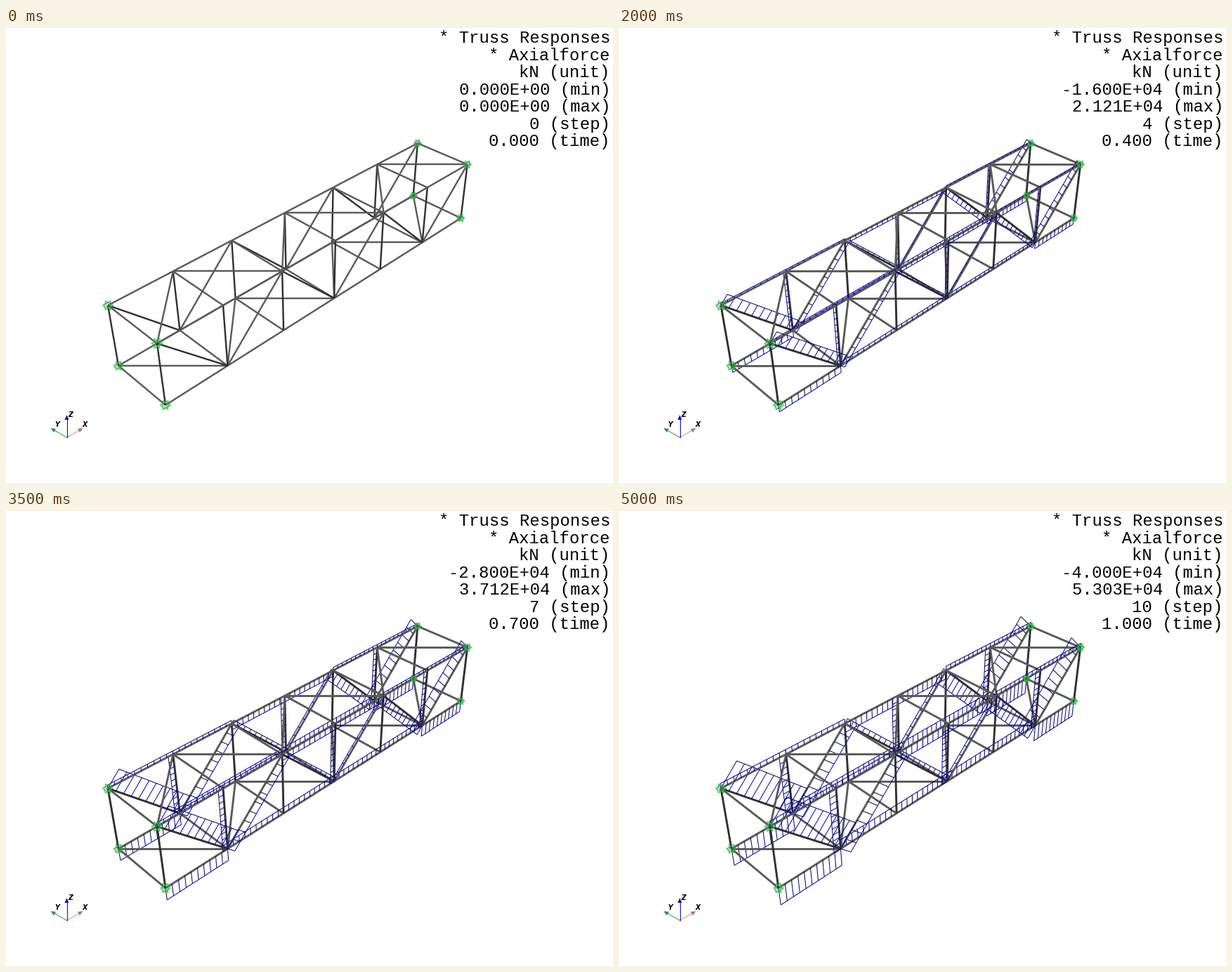
A matplotlib script that plays this animation: 864x648 px, repeating every 5.5 s.

```python
import numpy as np
import matplotlib.pyplot as plt
from matplotlib.animation import FuncAnimation
from matplotlib.collections import LineCollection
from matplotlib.patches import Polygon

W, H = 864, 648
PANELS, STEPS = 6, 10
LOAD = 15000.0                      # load on every inner top node, last step
MAX_FORCE = 2.5 * LOAD * np.sqrt(2)
SCALE = 0.39 / MAX_FORCE            # diagram height per unit of force
HATCHES = 10

# Isometric view with perspective
FOCAL, DIST = H / 2 / np.tan(np.radians(15)), 12.16
RIGHT = np.array([1, -1, 0]) / np.sqrt(2)
UP = np.array([1, 1, 2]) / np.sqrt(6)
FORWARD = np.array([1, 1, -1]) / np.sqrt(3)
CENTRE = np.array([PANELS / 2, 0.5, 0.5])


def project(p):
    q = np.asarray(p, float) - CENTRE
    s = FOCAL / (DIST + q @ FORWARD)
    return W / 2 + s * (q @ RIGHT), H / 2 - s * (q @ UP)


def depth(a, b):
    return ((np.asarray(a) + b) / 2 - CENTRE) @ FORWARD


def is_dark(d):
    """Upright and falling lines catch less light."""
    return abs(d[2]) > 1e-9 and d[0] * d[2] <= 1e-9


def node(i, y, z):
    return np.array([i, y, z], float)


def build_members():
    """List of (start, end, axial force at the last step)."""
    out = []
    for y in (0, 1):
        for i in range(PANELS):
            k = min(i, PANELS - 1 - i)
            top = (LOAD * 2 / 3, LOAD * 2 / 3, -LOAD * 4 / 3)[k]
            bottom = (-LOAD * 8 / 3, LOAD * 4 / 3, LOAD * 4 / 3)[k]
            diagonal = (-1) ** k * (2.5 - k) * LOAD * np.sqrt(2)
            z = (i + 1) % 2
            out += [(node(i, y, 1), node(i + 1, y, 1), top),
                    (node(i, y, 0), node(i + 1, y, 0), bottom),
                    (node(i, y, z), node(i + 1, y, 1 - z), diagonal)]
        for i in range(PANELS + 1):
            out.append((node(i, y, 1), node(i, y, 0), -LOAD * (i % 2)))
    for z in (0, 1):
        for i in range(PANELS + 1):
            out.append((node(i, 0, z), node(i, 1, z), 0))
        for i in range(PANELS):
            y = (i + 1 + z) % 2
            out.append((node(i, y, z), node(i + 1, 1 - y, z), 0))
    return sorted(out, key=lambda m: -depth(m[0], m[1]))


MEMBERS = build_members()


def diagram(a, b, force):
    """Outline and hatching of one force diagram."""
    d = (b - a) / np.linalg.norm(b - a)
    off = np.array([-d[2], 0, d[0]]) * force * SCALE
    lines = [(a + off, b + off)]
    for t in np.linspace(0, 1, HATCHES + 1):
        p = a + (b - a) * t
        lines.append((p, p + off))
    return lines


def truss_lines(step):
    segs, colors, widths = [], [], []

    def add(a, b, color, width):
        segs.append([project(a), project(b)])
        colors.append(color)
        widths.append(width)

    for a, b, force in MEMBERS:
        grey = "#303030" if is_dark(b - a) else "#5a5a58"
        add(a, b, grey, 2.9 if step else 2.4)
        if force and step:
            for p, q in diagram(a, b, force * step / STEPS):
                add(p, q, "#00006c" if is_dark(q - p) else "#0000a8", 1)
    return segs, colors, widths


def support_lines(r=0.046):
    """Three small squares, one in each coordinate plane, at the end nodes."""
    square = np.array([[-1, -1], [1, -1], [1, 1], [-1, 1], [-1, -1]]) * r
    out = []
    for i in (0, PANELS):
        for y in (0, 1):
            for z in (0, 1):
                for plane in ((0, 1), (1, 2), (0, 2)):
                    pts = np.tile(node(i, y, z), (5, 1))
                    pts[:, plane] += square
                    out.append([project(p) for p in pts])
    return out


def draw_arrow(ax, start, tip, color, head):
    start, tip = np.array(start), np.array(tip)
    u = (tip - start) / np.linalg.norm(tip - start)
    n = np.array([-u[1], u[0]])
    neck = tip - 7 * u
    ax.plot(*zip(start, neck), color=color, lw=1.2)
    ax.add_patch(Polygon([tip, neck + 3 * n, neck - 3 * n], fc=head, ec="none"))


fig = plt.figure(figsize=(W / 72, H / 72), dpi=72, facecolor="white")
ax = fig.add_axes([0, 0, 1, 1])
ax.set(xlim=(0, W), ylim=(H, 0))
ax.axis("off")

truss = LineCollection([], zorder=2)
ax.add_collection(truss)
ax.add_collection(LineCollection(support_lines(), colors="#25b53c",
                                 linewidths=0.9, zorder=3))

origin = (86.5, 583)
draw_arrow(ax, origin, (109.5, 570), "#dba296", "#a5756c")
draw_arrow(ax, origin, (63.5, 570), "#45b455", "#2f8f42")
draw_arrow(ax, origin, (86.5, 551), "#1a1ac8", "#0c0cb4")
for name, x, y in (("X", 108, 568), ("Y", 69, 568), ("Z", 88, 554)):
    ax.text(x, y, name, size=9.5, weight="bold", style="italic",
            family="DejaVu Sans")

FONT = 23.85
labels = [ax.text(0, 21.3 + 24.45 * i, "", size=FONT, color="black",
                  family="Liberation Mono") for i in range(7)]


def update(step):
    segs, colors, widths = truss_lines(step)
    truss.set_segments(segs)
    truss.set_color(colors)
    truss.set_linewidths(widths)
    rows = ("* Truss Responses", "* Axialforce", "kN (unit)",
            f"{-4000 * step:.3E} (min)",
            f"{MAX_FORCE * step / STEPS:.3E} (max)",
            f"{step} (step)", f"{step / STEPS:.3f} (time)")
    for label, row in zip(labels, rows):
        label.set_text(row)
        label.set_x(859.2 - len(row) * 0.6 * FONT)
    return [truss, *labels]


anim = FuncAnimation(fig, update, frames=STEPS + 1, interval=500,
                     repeat=True, repeat_delay=0, blit=False)
plt.show()
```
